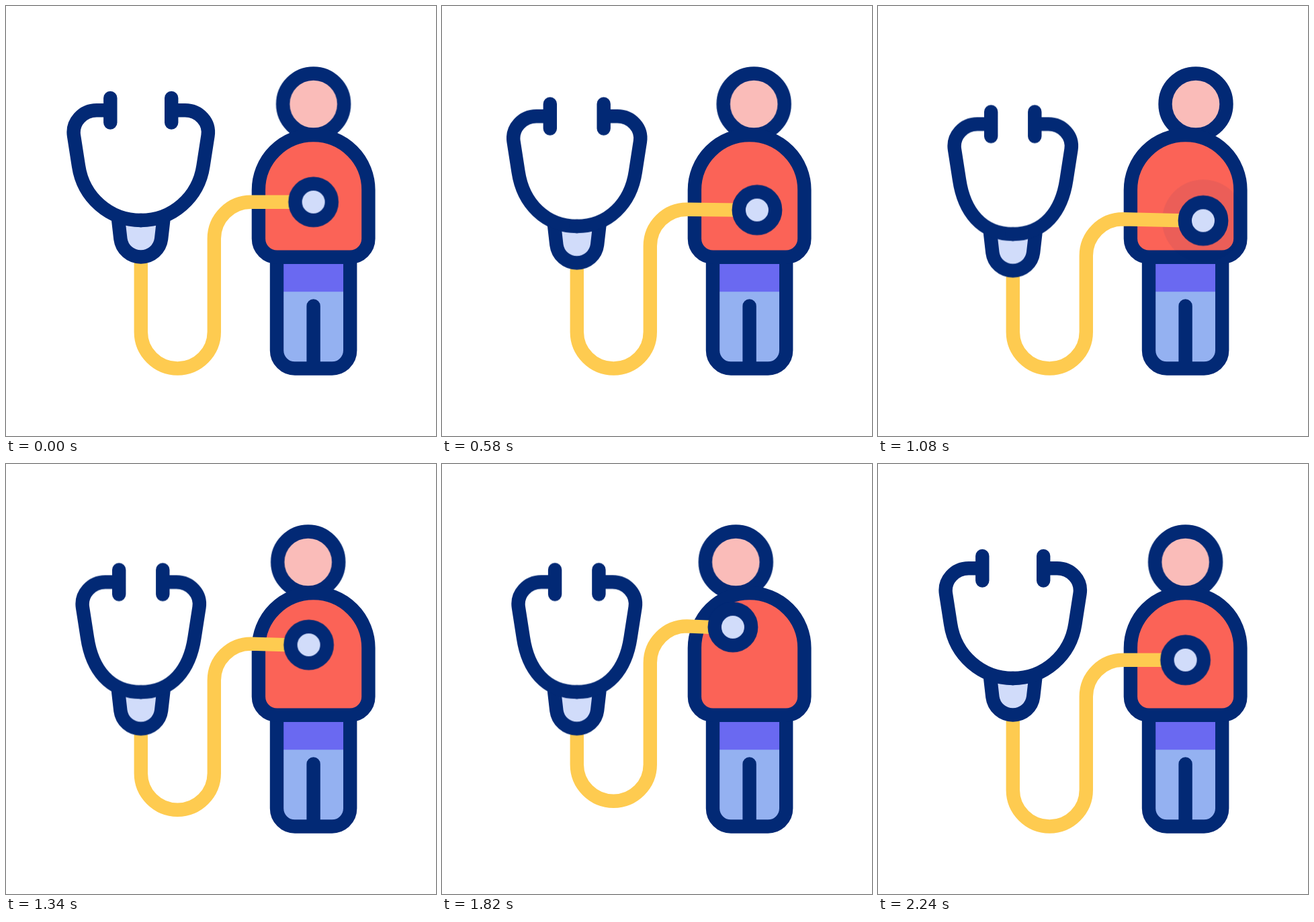
An HTML page for the animation above (2.4 s loop, 640 by 640 pixels).

```html
<!DOCTYPE html>
<html lang="en">
<head>
<meta charset="utf-8">
<title>Stethoscope check</title>
<style>
  html, body { margin: 0; width: 100%; height: 100%; overflow: hidden; background: #fff; }
  svg { display: block; width: 100vw; height: 100vh; }

  .line { fill: none; stroke: #022975; stroke-width: 20.4; stroke-linecap: round; stroke-linejoin: round; }
  .butt { stroke-linecap: butt; }
  .tube { stroke: #fecb50; stroke-linecap: butt; }
  .skin { fill: #fabcb9; }
  .shirt { fill: #fb6357; }
  .metal { fill: #d1dcfa; }

  .head, .disc, .tube, .scope, .arm, .grow {
    animation: 2.4s cubic-bezier(.333, 0, .667, 1) infinite;
  }
  .head { animation-name: head; }
  .disc { animation-name: disc; }
  .tube { animation-name: tube; }
  .scope { animation-name: scope; }
  .arm { animation-name: arm; }
  .grow { animation-name: grow; }
  .fade { animation: fade 2.4s linear infinite; }

  /* Rest, move low, pulse, move high, pulse, return */
  @keyframes head {
    0%, 16.667%, 91.667%, 100% { transform: translate(457.6px, 146px); }
    33.333%, 45.833% { transform: translate(473px, 146px); }
    62.5%, 75% { transform: translate(437.2px, 146px); }
  }
  @keyframes disc {
    0%, 16.667%, 91.667%, 100% { transform: translate(457.6px, 291.7px); }
    33.333%, 45.833% { transform: translate(484px, 319.4px); }
    62.5%, 75% { transform: translate(432.7px, 242.4px); }
  }
  @keyframes tube {
    0%, 16.667%, 91.667%, 100% {
      d: path("M200.8 374V485a54.5 54.5 0 0 0 109 0V346.2a54.5 54.5 0 0 1 54.5 -54.5L430 291.7");
    }
    33.333%, 45.833% {
      d: path("M200.8 394.5V485a54.5 54.5 0 0 0 109 0V371.8a54.5 54.5 0 0 1 54.5 -54.5L457 319.4");
    }
    62.5%, 75% {
      d: path("M200.8 394.5V447a54.5 54.5 0 0 0 109 0V295.5a54.5 54.5 0 0 1 54.5 -54.5L405.7 242.7");
    }
  }
  @keyframes scope {
    0%, 16.667%, 91.667%, 100% { transform: translateY(0); }
    33.333%, 75% { transform: translateY(20.5px); }
  }
  @keyframes arm {
    0%, 16.667%, 91.667%, 100% {
      d: path("M155.3 137V173.5M155.3 155.3H135C114 155.3 98 173 101 193L108 238C115 285 154 319 200.8 319H202");
    }
    33.333%, 75% {
      d: path("M168.2 137V173.5M168.2 155.3H148C127 155.3 111 173 114 193L121 238C128 285 154 319 200.8 319H202");
    }
  }
  @keyframes grow {
    0%, 33.333%, 62.5% { transform: scale(1); }
    45.833%, 62.49%, 75%, 100% { transform: scale(1.645); }
  }
  @keyframes fade {
    0%, 33.32%, 45.833%, 62.49%, 75%, 100% { opacity: 0; }
    33.333%, 62.5% { opacity: 1; }
  }
</style>
</head>
<body>
<svg viewBox="0 0 640 640">
  <!-- Legs -->
  <path fill="#94b1f1" d="M403 420H512.2V512.5a27 27 0 0 1 -27 27H430a27 27 0 0 1 -27 -27Z"/>
  <path fill="#6a69f1" d="M403 374H512.2V425.3H403Z"/>
  <path class="line" d="M403 374V512.5a27 27 0 0 0 27 27H485.2a27 27 0 0 0 27 -27V374M457.6 446.5V539.5"/>

  <!-- Head and body -->
  <g class="head"><circle class="line skin" style="fill:#fabcb9" r="45.5"/></g>
  <path class="line" style="fill:#fb6357" d="M375.9 273.8a81.75 81.75 0 0 1 163.5 0V346.3a27.5 27.5 0 0 1 -27.5 27.5H403.4a27.5 27.5 0 0 1 -27.5 -27.5Z"/>

  <g class="disc"><g class="fade"><circle class="grow" r="37.3" fill="#022975"/></g></g>

  <path class="line tube" d="M200.8 374V485a54.5 54.5 0 0 0 109 0V346.2a54.5 54.5 0 0 1 54.5 -54.5L430 291.7"/>
  <g class="disc"><circle class="line" style="fill:#d1dcfa" r="27.2"/></g>

  <!-- Stethoscope -->
  <g class="scope">
    <path class="line butt" style="fill:#d1dcfa" d="M167 317L170.4 346.8A30.6 30.6 0 0 0 231.1 346.8L234.5 317"/>
    <path class="line arm" d="M155.3 137V173.5M155.3 155.3H135C114 155.3 98 173 101 193L108 238C115 285 154 319 200.8 319H202"/>
    <g transform="matrix(-1 0 0 1 401.5 0)">
      <path class="line arm" d="M155.3 137V173.5M155.3 155.3H135C114 155.3 98 173 101 193L108 238C115 285 154 319 200.8 319H202"/>
    </g>
  </g>
</svg>
</body>
</html>
```
